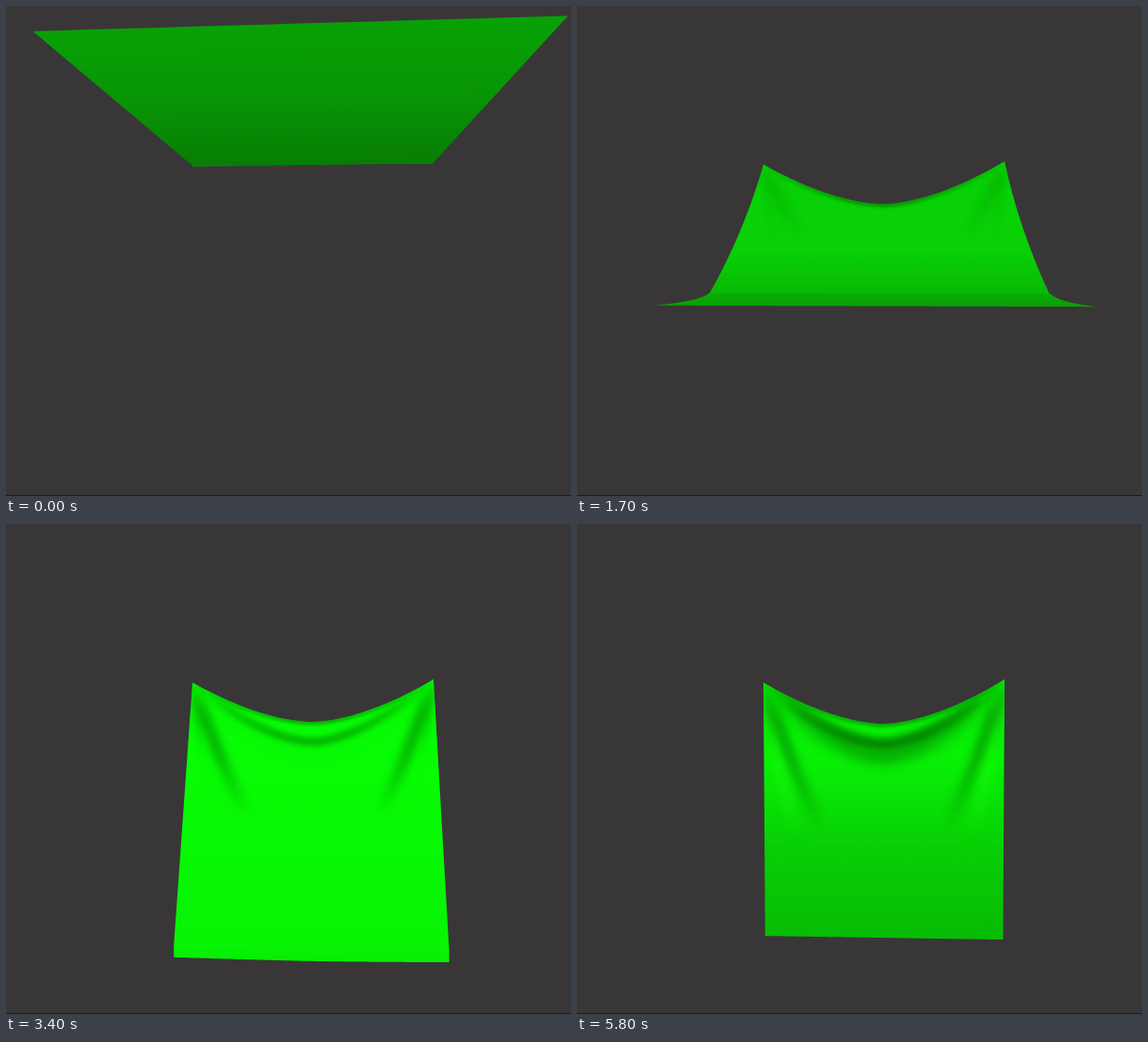
An HTML page with a canvas that plays this animation: 600 by 520 pixels, repeating every 5.9 s.

```html
<!DOCTYPE html>
<html lang="en">
<head>
<meta charset="utf-8">
<title>Falling cloth</title>
<style>
html, body { margin: 0; width: 600px; height: 520px; overflow: hidden; background: #393638; }
canvas { display: block; }
</style>
</head>
<body>
<canvas id="stage" width="600" height="520"></canvas>
<script>
const ctx = document.getElementById('stage').getContext('2d');
const LOOP = 5900, STEP = 100;
const HORIZON = 290, AXIS = 326, HALF = 128, TILT = .027;

const mix = (a, b, s) => a + (b - a) * s;
const bell = (t, centre, width) => Math.exp(-(((t - centre) / width) ** 2));
const ease = (t, from, span) => {
  const s = Math.min(1, Math.max(0, (t - from) / span));
  return s * s * (3 - 2 * s);
};
const green = g => `rgb(8,${Math.round(g)},5)`;
const dark = a => `rgba(0,50,0,${a})`;
const light = a => `rgba(20,255,10,${a})`;

// A horizontal cloth edge in perspective: world height (down) and nearness
function edge(height, scale) {
  const dy = height * scale, tilt = dy * TILT * scale / 2;
  const cx = AXIS - (scale - 1) * 11, half = HALF * scale;
  return {
    y: HORIZON + dy,
    l: [cx - half, HORIZON + dy - tilt],
    r: [cx + half, HORIZON + dy + tilt]
  };
}

const pins = edge(-123.5, 1);

function pose(t) {
  const height = mix(-122.5, 151, ease(t, -60, 3500));
  const scale = .96 + 1.26 / (1 + (t / 2130) ** 3.8);
  const hemScale = Math.min(scale, 1 + .41 * ease(t, 0, 1600));
  return {
    free: edge(height, scale),
    hem: edge(height - 11 * ease(t, 1000, 1500), hemScale),
    sag: 42.5 * ease(t, 0, 1200) + 7 * bell(t, 2100, 300) + 3 * ease(t, 2800, 1500),
    bulge: 17.5 * bell(t, 900, 400),
    bow: 9 * bell(t, 1900, 700),
    droop: 4 * bell(t, 2900, 500)
  };
}

function tones(t) {
  const lit = mix(150, 255, ease(t, 1000, 1300));
  const fade = ease(t, 2600, 3000);
  const low = lit - 66 * fade - 25 * bell(t, 1700, 300);
  return {
    top: lit - 15 * fade,
    mid: lit - 48 * fade,
    low,
    near: mix(125, low, ease(t, 900, 1100)),
    far: mix(161, low, ease(t, 2800, 700)) - 85 * bell(t, 2750, 300)
  };
}

function ramp(x0, y0, x1, y1, ...colors) {
  const g = ctx.createLinearGradient(x0, y0, x1, y1);
  colors.forEach((c, i) => g.addColorStop(i / (colors.length - 1), c));
  return g;
}

// Line between two points, pushed down by depth * shape(u)
function swing(path, a, b, depth, shape) {
  for (let i = 0; i <= 60; i++) {
    const u = i / 60;
    path.lineTo(mix(a[0], b[0], u), mix(a[1], b[1], u) + depth * shape(u));
  }
}
const hang = u => 1 - Math.abs(2 * u - 1) ** 1.7;
const belly = u => 1 / (1 + ((u - .5) / .17) ** 4);
const flat = () => 1;

function bodyPath({ hem, sag, bulge, bow }) {
  const p = new Path2D();
  const side = (a, b, dx) => [(a[0] + b[0]) / 2 + dx, (a[1] + b[1]) / 2 + bow / 3];
  swing(p, pins.r, pins.l, sag, hang);
  p.quadraticCurveTo(...side(pins.l, hem.l, bow), ...hem.l);
  swing(p, hem.l, hem.r, 1, u => flat() + bulge * belly(u));
  p.quadraticCurveTo(...side(pins.r, hem.r, -bow), ...pins.r);
  p.closePath();
  return p;
}

function flapPath({ free, hem, bulge, droop }) {
  const p = new Path2D();
  const bend = free.y > hem.y ? .7 : .2;
  const flare = k => [mix(hem[k][0], free[k][0], .2), mix(hem[k][1], free[k][1], bend)];
  p.moveTo(...free.l);
  p.quadraticCurveTo(...flare('l'), ...hem.l);
  swing(p, hem.l, hem.r, bulge, belly);
  p.quadraticCurveTo(...flare('r'), ...free.r);
  swing(p, free.r, free.l, droop, hang);
  p.closePath();
  return p;
}

function soft(blur, width, style, path) {
  ctx.filter = `blur(${blur}px)`;
  ctx.lineWidth = width;
  ctx.strokeStyle = style;
  ctx.stroke(path);
  ctx.filter = 'none';
}

function arc(depth, blur, width, alpha) {
  const p = new Path2D();
  swing(p, pins.l, pins.r, depth, hang);
  const c = [0, .6, .9, 1, .9, .6, 0].map(k => dark(k * alpha));
  soft(blur, width, ramp(pins.l[0], 0, pins.r[0], 0, ...c), p);
}

// Mirrored pair of folds running down from the pins
function folds(dx, y, blur, width, color, alpha) {
  for (const [pin, dir] of [[pins.l, 1], [pins.r, -1]]) {
    const p = new Path2D();
    p.moveTo(...pin);
    p.quadraticCurveTo(pin[0] + dir * dx * .4, mix(pin[1], y, .5), pin[0] + dir * dx, y);
    const c = [0, 1, .9, .5, 0].map(k => color(k * alpha));
    soft(blur, width, ramp(0, pin[1], 0, y, ...c), p);
  }
}

function creases(t, sag) {
  const late = ease(t, 3000, 2800), reach = ease(t, 1200, 3000);
  const band = .5 * ease(t, 1500, 2500), fold = .4 * ease(t, 1000, 1800);
  folds(mix(14, 36, reach), mix(235, 335, reach), 5, 14, light, .6 * late);
  folds(mix(38, 62, reach), mix(240, 325, reach), 5, 12, dark, fold);
  folds(12, 255, 3, 4, dark, fold * .5);
  arc(sag, 1.5, 7, .35);
  arc(sag + 21, 3, mix(7, 12, late), band);
  arc(sag + 34, 7, 16, .4 * late);
}

function draw(t) {
  const now = pose(t), tone = tones(t);
  const { free, hem } = now;
  const body = bodyPath(now);

  ctx.fillStyle = '#393638';
  ctx.fillRect(0, 0, 600, 520);

  ctx.fillStyle = ramp(0, pins.y, 0, hem.y + 1,
    green(tone.top), green(tone.top), green(tone.mid), green(tone.low));
  ctx.fill(body);
  ctx.save();
  ctx.clip(body);
  creases(t, now.sag);
  ctx.restore();

  const slope = (hem.r[1] - hem.l[1]) / (hem.r[0] - hem.l[0]);
  ctx.fillStyle = ramp(AXIS, hem.y, AXIS - slope * (free.y - hem.y), free.y,
    green(tone.near), green(mix(tone.near, tone.far, .7)), green(tone.far));
  ctx.fill(flapPath(now));

  ctx.fillStyle = '#1d1c1d';
  ctx.fillRect(0, 519, 600, 1);
}

const start = performance.now();
function tick() {
  const t = (performance.now() - start) % LOOP;
  draw(Math.floor(t / STEP) * STEP);
  requestAnimationFrame(tick);
}
tick();
</script>
</body>
</html>
```
